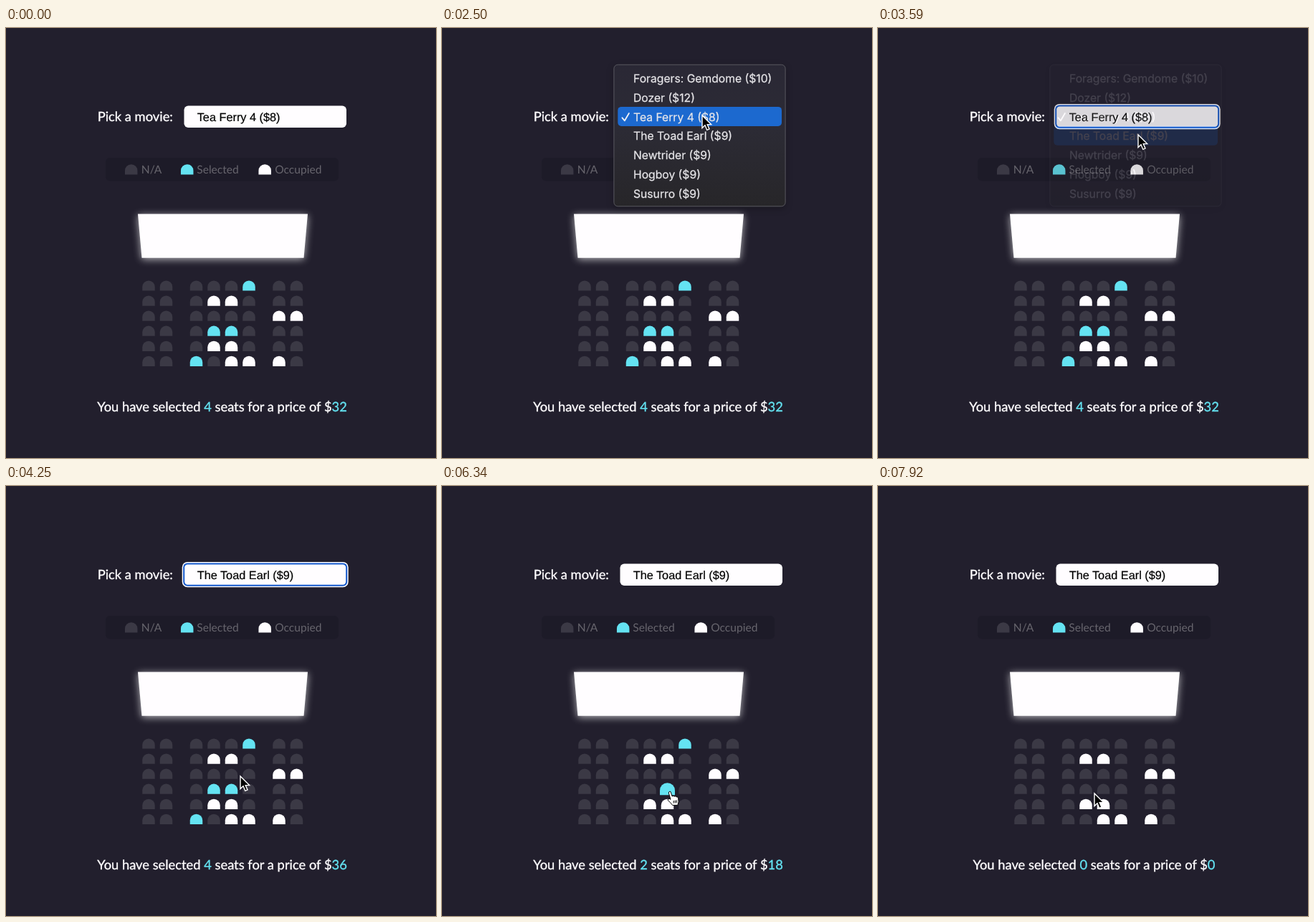
An HTML page for the animation above (8000 ms loop, 600 by 600 pixels).

```html
<!DOCTYPE html>
<html lang="en">
<head>
<meta charset="utf-8">
<title>Seat picker</title>
<style>
  html, body { margin: 0; width: 100%; height: 100%; overflow: hidden; background: #221f2d; }
  svg { display: block; width: 100vw; height: 100vh; }
  text { font-family: Lato, sans-serif; font-size: 18.33px; fill: #fffdff; white-space: pre; text-rendering: geometricPrecision; }
  .bold { stroke: #fffdff; stroke-width: .35px; }
  .legend text { font-size: 15.6px; fill: #67656d; }
  #film { font-family: "Liberation Sans", Arial, sans-serif; font-size: 16.3px; fill: #000; stroke: #000; stroke-width: .2px; }
  #menu text { font-family: Inter, sans-serif; font-size: 15.7px; fill: #e8e7ea; stroke: #e8e7ea; stroke-width: .25px; }
  #panel { filter: drop-shadow(0 3px 5px rgba(0, 0, 0, .25)); }
  .free { fill: #3b3945; }
  .picked, .num { fill: #64e3f2; }
  .num { stroke: #64e3f2; }
  .taken { fill: #fffdff; }
  #screen { fill: #fffdff; filter: drop-shadow(0 2.5px 5.5px rgba(255, 255, 255, .68)); }
</style>
</head>
<body>
<svg viewBox="0 0 600 600">
  <defs>
    <path id="seat" d="M-8.75 7.1V1.65a8.75 8.75 0 0 1 17.5 0V7.1z"/>
    <linearGradient id="glass" x1="0" y1="0" x2="0" y2="1">
      <stop offset="0" stop-color="#2a2835"/>
      <stop offset=".45" stop-color="#2c2b35"/>
      <stop offset="1" stop-color="#272629"/>
    </linearGradient>
  </defs>

  <text class="bold" x="127.7" y="129.6">Pick a movie:</text>
  <g id="ring">
    <rect x="245.7" y="105.9" width="232" height="35.4" rx="7.5" fill="#fffdff"/>
    <rect x="247.2" y="107.4" width="229" height="32.4" rx="6.2" fill="#1257cb"/>
  </g>
  <rect id="field" fill="#fffdff"/>
  <text id="film" x="266.7" y="130"></text>

  <g class="legend">
    <rect x="139" y="181" width="325" height="32.5" rx="5.8" fill="#1d1b28"/>
    <use href="#seat" x="174.7" y="197.3" class="free"/>
    <use href="#seat" x="252.7" y="197.3" class="picked"/>
    <use href="#seat" x="361.2" y="197.3" class="taken"/>
    <text x="188.8" y="203">N/A</text>
    <text x="266.3" y="203">Selected</text>
    <text x="375.2" y="203">Occupied</text>
  </g>

  <polygon id="screen" points="184,259.5 421,259.5 415.5,320.8 189.5,320.8"/>
  <g id="seats"></g>
  <text class="bold" x="301.5" y="534.6" text-anchor="middle">You have selected <tspan id="count" class="num"></tspan> seats for a price of $<tspan id="price" class="num"></tspan></text>

  <g id="menu">
    <rect id="panel" x="239.9" y="51.2" width="239.2" height="197.6" rx="5.5" fill="url(#glass)" stroke="#5b5a61"/>
    <rect id="bar" x="245.3" width="228.7" height="27" rx="5" fill="#1c69cf"/>
    <path d="M251.5 125.3l3.4 4 6-10.3" fill="none" stroke="#f2f2f5" stroke-width="1.8" stroke-linecap="round" stroke-linejoin="round"/>
  </g>

  <path id="arrow" d="M0 0V17.6L4 13.8 6.8 20.4 10 19 7.2 12.6H12.6z" fill="#000" stroke="#fff" stroke-width="1.4"/>
  <path id="hand" d="M-1.8 1Q-1.2-1.4 .9-.7L3.2 6Q5 4.6 6.3 6.2 8 5 9.2 6.8 11 6.2 11.6 8.4 13 14 10.8 18.4H3.6Q1 14.5-2.8 11.6-3.4 9-.5 9.4L1 10.4z M5.2 12v3.6 M7.4 11.6v3.8 M9.4 11.4v3.6" fill="#fff" stroke="#000" stroke-width="1" stroke-linejoin="round"/>
</svg>
<script>
const LOOP = 8000, STEP = 1000 / 12, ROW_H = 26.85;
const $ = id => document.getElementById(id);
const make = (tag, parent, attrs) => {
  const el = document.createElementNS('http://www.w3.org/2000/svg', tag);
  set(el, attrs);
  return parent.appendChild(el);
};
function set(el, attrs) {
  for (const key in attrs) el.setAttribute(key, attrs[key]);
}
const show = (el, on) => { el.style.display = on ? '' : 'none'; };

const films = ['Foragers: Gemdome ($10)', 'Dozer ($12)', 'Tea Ferry 4 ($8)', 'The Toad Earl ($9)',
  'Newtrider ($9)', 'Hogboy ($9)', 'Susurro ($9)'];
films.forEach((name, i) => {
  make('text', $('menu'), { x: 267, y: 75.9 + i * ROW_H }).textContent = name;
});

// Seat map: . free, x selected, o occupied
const plan = ['.....x..', '...oo...', '......oo', '...xx...', '...oo...', '..x.ooo.'];
const columns = [199, 223.5, 265.5, 290, 314.5, 339, 381, 405.5];
const seats = plan.flatMap((row, r) => [...row].map((mark, c) => ({
  id: r + '-' + c, mark, x: columns[c], y: 359.5 + r * 21.07,
  el: make('use', $('seats'), { href: '#seat' })
})));

const OPEN = 2160, CHOOSE = 3200, FADE = 3300, CHANGE = 3660;
const clicks = { '3-3': 4830, '5-2': 5700, '3-4': 6480, '0-5': 7060 };

// Cursor stops: time, x, y
const stops = [[600, 430, 565], [1560, 359.5, 90], [1650, 359.5, 89], [1920, 363, 122], [2850, 363, 122],
  [3100, 363, 149], [3620, 363, 149], [4170, 327, 405], [4420, 327, 405], [4700, 294, 427],
  [5300, 294, 427], [5580, 269, 468], [5830, 269, 468], [6150, 318, 427], [6600, 318, 427],
  [6880, 343, 362], [7420, 343, 362], [7850, 302, 429]];

function cursorAt(t) {
  const i = stops.findIndex(s => s[0] > t);
  if (i < 0) return stops[stops.length - 1].slice(1);
  if (i === 0) return null;
  const [t0, x0, y0] = stops[i - 1], [t1, x1, y1] = stops[i];
  const u = (t - t0) / (t1 - t0), k = u * u * (3 - 2 * u);
  return [x0 + (x1 - x0) * k, y0 + (y1 - y0) * k];
}

function drawSeats(t, pos) {
  let count = 0, hover = false;
  for (const s of seats) {
    const picked = s.mark === 'x' && t < clicks[s.id];
    const over = pos && s.mark !== 'o' &&
      Math.abs(pos[0] - s.x) < 8.75 && Math.abs(pos[1] - s.y) < 7.1;
    if (picked) count++;
    if (over) hover = true;
    set(s.el, {
      class: picked ? 'picked' : s.mark === 'o' ? 'taken' : 'free',
      transform: `translate(${s.x} ${s.y}) scale(${over ? 1.2 : 1})`
    });
  }
  const each = t < CHANGE ? 8 : 9;
  $('count').textContent = count;
  $('price').textContent = count * each;
  return hover;
}

function drawMenu(t, pos) {
  const focused = t >= OPEN && t < clicks['3-3'];
  show($('ring'), focused);
  set($('field'), focused
    ? { x: 249.2, y: 109.4, width: 225, height: 28.4, rx: 4.2 }
    : { x: 248.5, y: 108.5, width: 226.5, height: 30.5, rx: 5.8 });
  $('film').textContent = films[t < CHANGE ? 2 : 3];

  const alpha = t < OPEN ? 0 : Math.max(0, Math.min(1, 1 - (t - FADE) / 341));
  show($('menu'), alpha > 0);
  $('menu').style.opacity = alpha;
  if (!alpha) return;
  const row = Math.floor((pos[1] - 56.5) / ROW_H);
  set($('bar'), { y: 56.2 + row * ROW_H });
  show($('bar'), t < CHOOSE || t > CHOOSE + 80);
}

function draw(now) {
  const t = Math.floor((now % LOOP) / STEP) * STEP;
  const pos = cursorAt(t);
  const hover = drawSeats(t, pos);
  drawMenu(t, pos);
  show($('arrow'), pos && !hover);
  show($('hand'), pos && hover);
  if (pos) set($(hover ? 'hand' : 'arrow'), { transform: `translate(${pos[0]} ${pos[1]})` });
}

const start = performance.now();
function tick() {
  draw(performance.now() - start);
  requestAnimationFrame(tick);
}
tick();
</script>
</body>
</html>
```
